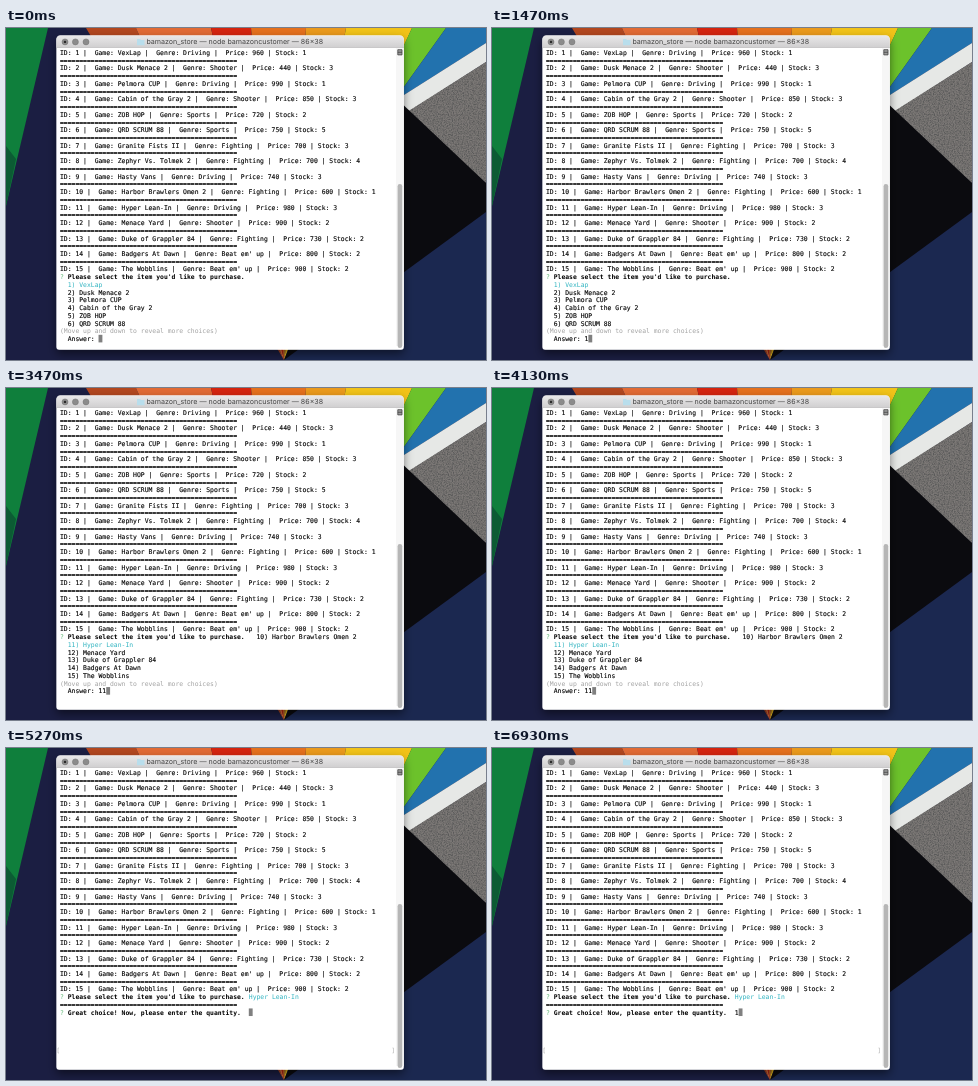
Write an HTML page that moves like this. It is 480x332 px and loops after 6990 ms.

```html
<!DOCTYPE html>
<html lang="en">
<head>
<meta charset="utf-8">
<title>Store terminal</title>
<style>
  html, body { margin: 0; width: 100%; height: 100%; overflow: hidden; background: #1b1e42; }
  svg { display: block; width: 480px; height: 332px; }
  #screen text {
    font: 6.4px "DejaVu Sans Mono", "Liberation Mono", monospace;
    fill: #000; white-space: pre; text-rendering: geometricPrecision;
  }
  #screen .plain { stroke: #000; stroke-width: .12; }
  #screen .bold { font-weight: bold; }
  #screen .pick { fill: #2fb3c0; }
  #screen .mark { fill: #62b878; }
  #screen .dim { fill: #a2a2a2; }
  .title { font: 7.1px Inter, "Liberation Sans", sans-serif; fill: #444; text-rendering: geometricPrecision; }
</style>
</head>
<body>
<svg viewBox="0 0 480 332" xmlns="http://www.w3.org/2000/svg">
  <defs>
    <linearGradient id="bar" x2="0" y2="1">
      <stop stop-color="#e9e8e9"/><stop offset="1" stop-color="#d0cfd0"/>
    </linearGradient>
    <filter id="shadow" x="-10%" y="-10%" width="120%" height="125%">
      <feDropShadow dx="0" dy="4" stdDeviation="5" flood-opacity=".5"/>
    </filter>
    <filter id="grain" x="0" y="0" width="100%" height="100%">
      <feTurbulence type="fractalNoise" baseFrequency=".8" numOctaves="2" seed="4"/>
      <feColorMatrix values="0 0 0 0 .1  0 0 0 0 .1  0 0 0 0 .1  2.4 0 0 0 -.85"/>
      <feComposite in2="SourceGraphic" operator="in" result="dots"/>
      <feMerge><feMergeNode in="SourceGraphic"/><feMergeNode in="dots"/></feMerge>
    </filter>
  </defs>

  <!-- wallpaper: rays fanning out from the bottom -->
  <rect width="480" height="332" fill="#1b1e42"/>
  <path d="M278 332L480 184V332Z" fill="#1b2850"/>
  <path d="M0 0H42L0 178Z" fill="#0f7f3c"/>
  <path d="M0 118L10 131L0 178Z" fill="#0c5b34"/>
  <path d="M80 0H130L278 332Z" fill="#b3471f"/>
  <path d="M130 0H205L278 332Z" fill="#e26a35"/>
  <path d="M205 0H245L278 332Z" fill="#d5240f"/>
  <path d="M245 0H300L278 332Z" fill="#e5701d"/>
  <path d="M300 0H340L278 332Z" fill="#eb9a1c"/>
  <path d="M340 0H406L390 35L278 332Z" fill="#f2c318"/>
  <path d="M406 0H440L390 70V34Z" fill="#6cc22b"/>
  <path d="M440 0H480V15L390 72V70Z" fill="#2272ae"/>
  <path d="M480 15V34L390 92V72Z" fill="#e6e8e6"/>
  <path d="M480 34V155L390 78V91Z" fill="#7b7876" filter="url(#grain)"/>
  <path d="M390 70L480 155V184L278 332Z" fill="#0b0b0f"/>

  <!-- window -->
  <path d="M50.4 12q0-4.5 4-4.5H393.8q4 0 4 4.5V318.8q0 3-3 3H53.4q-3 0-3-3Z" fill="#fff" filter="url(#shadow)"/>
  <path d="M50.4 19.5V12q0-4.5 4-4.5H393.8q4 0 4 4.5V19.5Z" fill="url(#bar)"/>
  <path d="M50.4 19.5H397.8" stroke="#b5b4b5" stroke-width=".6"/>
  <g fill="#8b8b8b" stroke="#737373" stroke-width=".5">
    <circle cx="59" cy="13.9" r="3"/>
    <circle cx="69.4" cy="13.9" r="3"/>
    <circle cx="80" cy="13.9" r="3"/>
  </g>
  <circle cx="59" cy="13.9" r="1.2" fill="#2b2b2b"/>
  <path d="M131 11h3l1 1h3.5v5.3H131Z" fill="#b9deec"/>
  <text class="title" x="140.4" y="16.4">bamazon_store — node bamazoncustomer — 86×38</text>
  <rect x="390" y="20" width="7.8" height="298" fill="#f6f6f6"/>
  <rect x="391.6" y="156" width="4.6" height="164" rx="2.3" fill="#b6b6b6"/>
  <path d="M391.8 21.7h4.2v5.2h-4.2ZM391.8 24.3h4.2" fill="#999" stroke="#444" stroke-width=".8"/>
  <g id="screen"></g>
</svg>

<script>
const LOOP = 6990;
const FIRST = 1235, SECOND = 1670, ENTER = 4800, CHOSEN = 4930, QTY = 6400;
const LEFT = 54, COL = 3.853, TOP = 20.8, ROW = 7.73;

const games = [
  ["VexLap", "Driving", 960, 1],
  ["Dusk Menace 2", "Shooter", 440, 3],
  ["Pelmora CUP", "Driving", 990, 1],
  ["Cabin of the Gray 2", "Shooter", 850, 3],
  ["ZOB HOP", "Sports", 720, 2],
  ["QRD SCRUM 88", "Sports", 750, 5],
  ["Granite Fists II", "Fighting", 700, 3],
  ["Zephyr Vs. Tolmek 2", "Fighting", 700, 4],
  ["Hasty Vans", "Driving", 740, 3],
  ["Harbor Brawlers Omen 2", "Fighting", 600, 1],
  ["Hyper Lean-In", "Driving", 980, 3],
  ["Menace Yard", "Shooter", 900, 2],
  ["Duke of Grappler 84", "Fighting", 730, 2],
  ["Badgers At Dawn", "Beat em' up", 800, 2],
  ["The Wobblins", "Beat em' up", 900, 2]
];
const rule = "=".repeat(46);
const screen = document.getElementById("screen");
const spans = [];

function add(parent, tag, attrs = {}) {
  const el = document.createElementNS("http://www.w3.org/2000/svg", tag);
  for (const key in attrs) el.setAttribute(key, attrs[key]);
  return parent.appendChild(el);
}

function put(parent, row, col, text, cls = "plain") {
  const y = TOP + row * ROW + 6.2;
  add(parent, "text", { x: LEFT + col * COL, y, class: cls }).textContent = text;
}

// A group that is visible only from one time to another.
function during(from, to) {
  const el = add(screen, "g");
  spans.push({ el, from, to });
  return el;
}

function cursor(parent, row, col) {
  add(parent, "rect", {
    x: LEFT + col * COL, y: TOP + row * ROW, width: COL, height: 7.6, fill: "#808080"
  });
}

function typed(from, to, row, col, text) {
  const g = during(from, to);
  put(g, row, col, text);
  cursor(g, row, col + text.length);
}

function choices(parent, start, end) {
  for (let i = start; i <= end; i++) {
    put(parent, 30 + i - start, 2, `${i}) ${games[i - 1][0]}`, i === start ? "pick" : "plain");
  }
  const row = 31 + end - start;
  put(parent, row, 0, "(Move up and down to reveal more choices)", "dim");
  put(parent, row + 1, 2, "Answer:");
}

games.forEach(([name, genre, price, stock], i) => {
  put(screen, i * 2, 0,
    `ID: ${i + 1} |  Game: ${name} |  Genre: ${genre} |  Price: ${price} | Stock: ${stock}`);
  if (i < games.length - 1) put(screen, i * 2 + 1, 0, rule);
});
put(screen, 29, 0, "?", "mark");
put(screen, 29, 2, "Please select the item you'd like to purchase.", "bold");

choices(during(0, SECOND), 1, 6);
typed(0, FIRST, 37, 10, "");
typed(FIRST, SECOND, 37, 10, "1");

const lastPage = during(SECOND, CHOSEN);
put(lastPage, 29, 51, `10) ${games[9][0]}`);
choices(lastPage, 11, 15);
typed(SECOND, CHOSEN, 36, 10, "11");

add(during(ENTER, LOOP), "path", {
  d: "M53 300h-1v5h1M386.5 300h1v5h-1", fill: "none", stroke: "#b4b4b4", "stroke-width": .6
});

const quantity = during(CHOSEN, LOOP);
put(quantity, 29, 49, games[10][0], "pick");
put(quantity, 30, 0, rule);
put(quantity, 31, 0, "?", "mark");
put(quantity, 31, 2, "Great choice! Now, please enter the quantity.", "bold");
typed(CHOSEN, QTY, 31, 49, "");
typed(QTY, LOOP, 31, 49, "1");

const begin = performance.now();
function draw() {
  const t = (performance.now() - begin) % LOOP;
  for (const { el, from, to } of spans) {
    el.style.display = t >= from && t < to ? "" : "none";
  }
  requestAnimationFrame(draw);
}
draw();
</script>
</body>
</html>
```
